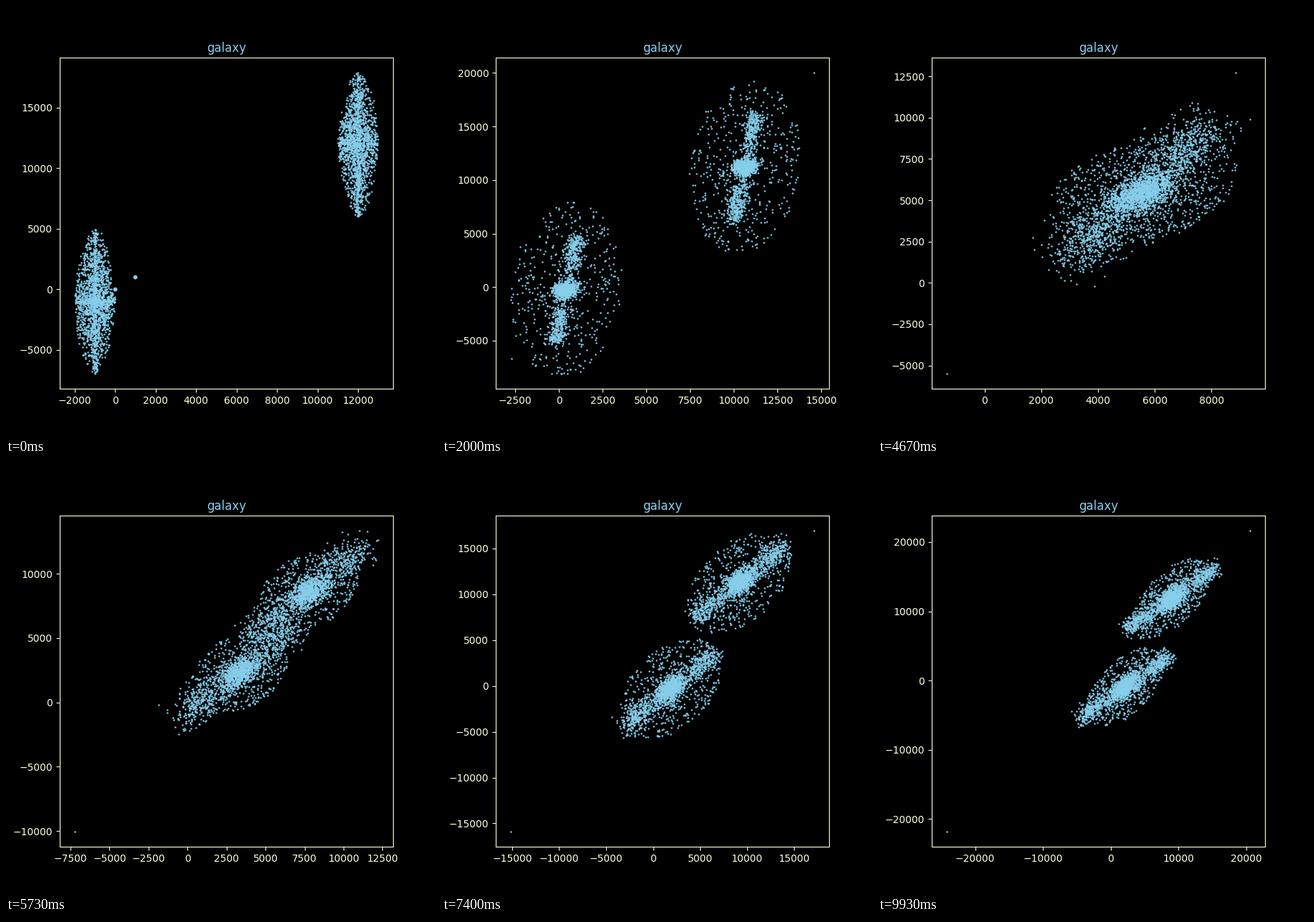
Write a matplotlib script that moves like this. It is 600 px wide and 600 px high and loops after 9990 ms.

```python
import numpy as np
import matplotlib.pyplot as plt
from matplotlib.animation import FuncAnimation

FRAMES, LOOP_MS = 150, 9990
STAR, FRAME = "skyblue", "lightyellow"
CORE, ARMS, HALO = 700, 640, 460
MIDDLE = 5500

# Signed half distance between the centres; the knot before zero makes a start at rest.
DIST_T = np.array([-30., 0, 30, 54, 86, 111, 126, 149])
DIST = np.array([7700., 9190, 7700, 4650, -3850, -6900, -7650, -7230])

# Tilt in degrees and length of the arms.
ARM_T = [0, 30, 54, 86, 149]
ARM_TILT = [90, 83, 76, 44, 34]
ARM_LENGTH = [6000, 4900, 4100, 4700, 7800]


def smooth(t, start, end):
    u = np.clip((t - start) / (end - start), 0, 1)
    return u * u * (3 - 2 * u)


def glide(t, knots, values):
    """Smooth cubic path through the values at the knots."""
    k = min(np.searchsorted(knots, t, "right") - 1, len(knots) - 2)
    h = knots[k + 1] - knots[k]
    u = (t - knots[k]) / h
    slope = np.gradient(values, knots) * h
    return ((1 + 2 * u) * (1 - u) ** 2 * values[k] + u * (1 - u) ** 2 * slope[k]
            + u * u * (3 - 2 * u) * values[k + 1] + u * u * (u - 1) * slope[k + 1])


def unit(degrees):
    a = np.radians(degrees)
    return np.array([np.cos(a), np.sin(a)])


def cloud(r, angle, width, height, lean):
    """Elliptic cloud whose x and y are correlated by lean."""
    a, b = r * np.cos(angle), r * np.sin(angle)
    return np.column_stack([width * a,
                            height * (lean * a + np.sqrt(1 - lean ** 2) * b)])


class Galaxy:
    def __init__(self, seed, side, stray):
        rng = np.random.default_rng(seed)
        n = CORE + ARMS + HALO
        self.side, self.stray = side, np.array(stray)

        angle = rng.uniform(0, 2 * np.pi, n)
        start = np.column_stack([1000 * rng.random(n) * np.cos(angle),
                                 6000 * rng.random(n) * np.sin(angle)])
        # Stars near the short axis form the core, near the long axis the arms.
        start = start[np.argsort(abs(start[:, 1]))]
        rest = start[CORE:]
        start[CORE:] = rest[np.argsort(abs(rest[:, 0]))]
        self.start = start

        self.core_r = rng.rayleigh(1, CORE)
        self.core_a = rng.uniform(0, 2 * np.pi, CORE)
        self.core_spin = rng.uniform(.03, .08, CORE)
        self.halo_r = rng.random(HALO) ** .55
        self.halo_a = rng.uniform(0, 2 * np.pi, HALO)
        self.reach = np.sign(start[CORE:CORE + ARMS, 1:]) * rng.random((ARMS, 1)) ** .55
        self.jitter = rng.normal(size=(ARMS, 2))

    def centre(self, t):
        return MIDDLE + self.side * glide(t, DIST_T, DIST) * unit(45 + 17 * t / FRAMES)

    def points(self, t):
        size = max(350, 350 + 5 * (t - 30))
        core = cloud(self.core_r, self.core_a + self.core_spin * t,
                     size, size, min(.5, t / 170))

        arm = np.interp(t, ARM_T, ARM_LENGTH) * unit(np.interp(t, ARM_T, ARM_TILT))
        spread = np.clip(9 * t, 170, 620)
        arms = self.reach * arm + self.jitter * [spread, 1.15 * spread]

        # The halo flattens on approach and widens as the galaxies part again.
        width = 3200
        if t > 72:
            width = max(width, .8 * abs(glide(t, DIST_T, DIST)))
        height = width + 5100 * (1 - smooth(t, 28, 54))
        halo = cloud(self.halo_r, self.halo_a + .02 * t, width, height, t / 260)

        settled = smooth(t, 0, 18)
        stars = (1 - settled) * self.start + settled * np.vstack([core, arms, halo])
        lone = self.side * self.stray * np.sin(np.pi * min(t / 86, 1)) ** .5
        return self.centre(t) + np.vstack([stars, lone])


def thrown(t, galaxy, place, speed, brake):
    """Star that leaves its galaxy and slows down on its way out."""
    tau = t - 86
    away = np.array(place) + np.array(speed) * tau + np.array(brake) * tau ** 2
    out = smooth(t, 56, 70)
    return (1 - out) * galaxy.centre(t) + out * away


lower = Galaxy(3, -1, (3300, 6800))
upper = Galaxy(8, 1, (4200, 9300))

plt.rcParams.update({
    "font.family": "DejaVu Sans",
    "figure.facecolor": "black", "axes.facecolor": "black",
    "axes.edgecolor": FRAME, "xtick.color": FRAME, "ytick.color": FRAME,
})
fig, ax = plt.subplots(figsize=(6, 6), dpi=100)
ax.set_title("galaxy", color=STAR)
stars, = ax.plot([], [], "o", color=STAR, ms=.8, mew=1)
seeds, = ax.plot([0, 1000], [0, 1000], "o", color=STAR, ms=3.2, mew=1)


def draw(i):
    xy = np.vstack([
        lower.points(i), upper.points(i),
        thrown(i, upper, (-7215, -10050), (-348, -265), (1.25, 1.24)),
        thrown(i, lower, (12200, 12650), (238, 190), (-1.68, -.75)),
    ])
    stars.set_data(xy[:, 0], xy[:, 1])
    seeds.set_visible(i == 0)
    low, high = xy.min(axis=0), xy.max(axis=0)
    pad = .05 * (high - low)
    (left, bottom), (right, top) = low - pad, high + pad
    ax.set_xlim(left, right)
    ax.set_ylim(bottom, top)
    return stars, seeds


anim = FuncAnimation(fig, draw, frames=FRAMES, interval=LOOP_MS / FRAMES,
                     repeat=True, repeat_delay=0, blit=False)
plt.show()
```
